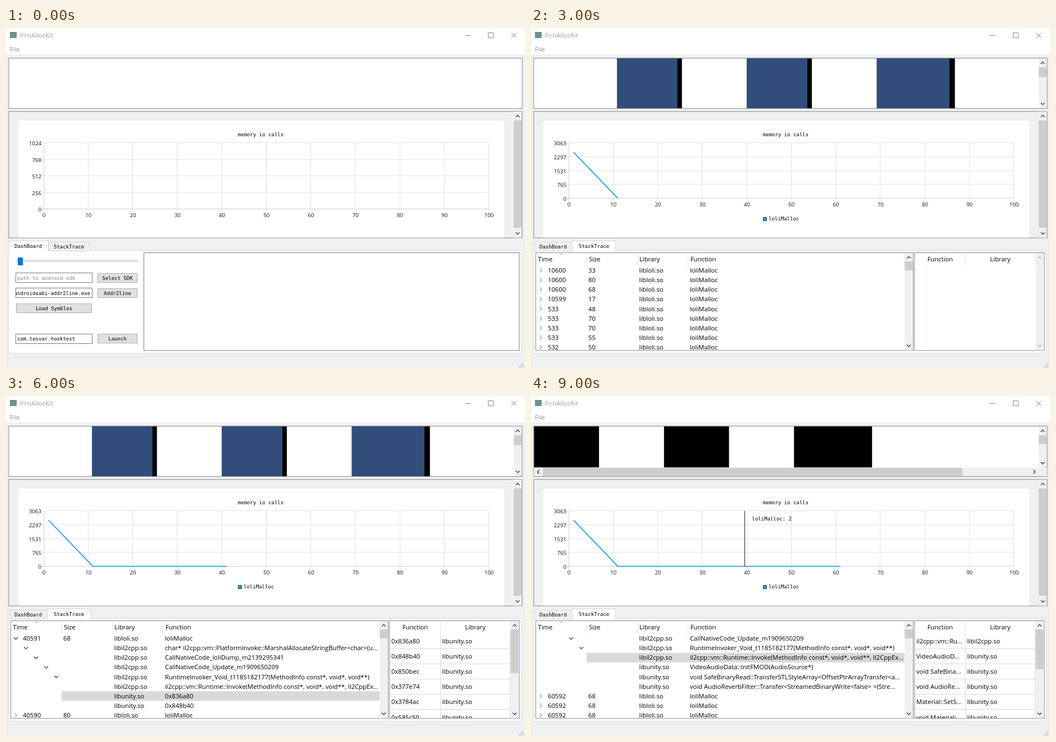
These frames come from a looping animation (924x606 px, 10 s). An HTML page:

```html
<!DOCTYPE html>
<html lang="en">
<head>
<meta charset="utf-8">
<title>Memory profiler session</title>
<style>
  html, body { margin: 0; width: 100%; height: 100%; overflow: hidden; background: #f0f0f0; }
  svg { display: block; }
  text { font: 11.23px "Open Sans", "Noto Sans CJK SC", "Noto Sans CJK", sans-serif; white-space: pre; }
  .mono { font: 9.02px "DejaVu Sans Mono", monospace; }
  .axis { font-size: 9.7px; }
  .dialog { filter: drop-shadow(0 1px 4px #0007); }
</style>
</head>
<body>
<svg id="stage" width="924" height="606" viewBox="0 0 924 606"></svg>
<script>
const BORDER = '#828790', GRID = '#e2e2e2', SELECTED = '#d9d9d9', BLUE = '#209fdf';

// ---- drawing helpers, each returns SVG markup
const escapeText = s => String(s).replace(/&/g, '&amp;').replace(/</g, '&lt;');
const text = (x, y, s, fill = '#000', anchor = 'start', cls = '') =>
  `<text x="${x}" y="${y}" fill="${fill}" text-anchor="${anchor}" class="${cls}">${escapeText(s)}</text>`;
const mono = (x, y, s, fill, anchor) => text(x, y, s, fill, anchor, 'mono');
const fill = (x, y, w, h, color, extra = '') =>
  `<rect x="${x}" y="${y}" width="${w}" height="${h}" fill="${color}" ${extra}/>`;
// outlined box with its border just inside x..x2, y..y2
const box = (x, y, x2, y2, color, stroke) =>
  fill(x + .5, y + .5, x2 - x - 1, y2 - y - 1, color, `stroke="${stroke}"`);
const path = (d, stroke, width = 1, extra = '') =>
  `<path d="${d}" fill="none" stroke="${stroke}" stroke-width="${width}" ${extra}/>`;
const clip = (x, y, w, h, content) =>
  `<svg x="${x}" y="${y}" width="${w}" height="${h}" viewBox="${x} ${y} ${w} ${h}">${content}</svg>`;
const turns = { down: 0, up: 180, right: -90, left: 90 };
const chevron = (x, y, dir, color = '#505050', width = 1.5, size = 3.4) =>
  path(`M${-size} ${-size / 2}L0 ${size / 2} ${size} ${-size / 2}`, color, width,
    `transform="translate(${x} ${y}) rotate(${turns[dir]})"`);
const triangle = (x, y, color, size = 3.5) =>
  `<path d="M${x - size} ${y - size / 2}h${size * 2}l${-size} ${size * 1.1}z" fill="${color}"/>`;
const map = (list, f) => list.map(f).join('');

function scrollbar(x, y, y2, thumb) {
  const color = thumb ? '#505050' : '#bdbdbd', cx = x + 7;
  return fill(x, y, 14, y2 - y, '#f0f0f0') + (thumb ? fill(x, thumb[0], 14, thumb[1] - thumb[0], '#cdcdcd') : '') +
    chevron(cx, y + 8, 'up', color) + chevron(cx, y2 - 8, 'down', color);
}

// ---- main window
function windowFrame() {
  return fill(0, 0, 924, 606, '#f0f0f0') + fill(0, 0, 924, 47, '#fff') +
    fill(7, 7, 12, 11, '#6f9290') + text(25, 17, 'FirnAllocKit', '#999') + text(7, 42, 'File', '#8a8a8a') +
    path('M817 13.5h10M858.5 8.5h9v9h-9zM899.5 8.5l9 9m0-9l-9 9', '#888') +
    map([[919, 598], [916, 601], [919, 601], [913, 604], [916, 604], [919, 604]], ([x, y]) => fill(x, y - 1, 2, 2, '#bfbfbf'));
}

function screenshots({ shots = [], black, wide }) {
  const bottom = wide ? 127.5 : 143;
  let out = box(4.4, 53.2, 919.4, 143.9, '#fff', BORDER);
  shots.forEach((x, i) => {
    const last = i == shots.length - 1, w = last ? 139 : 115.7, edge = last ? 9.7 : 8;
    out += fill(x, 54.2, w, bottom - 54.2, '#000') + (black ? '' : fill(x, 54.2, w - edge, bottom - 54.2, '#314e7b'));
  });
  if (shots.length) out += scrollbar(904, 54.2, bottom, [70, wide ? 86 : 87.5]);
  if (wide) out += fill(5.4, 127.5, 913, 15.4, '#f0f0f0') + fill(21, 128, 747, 14.5, '#cdcdcd') +
    chevron(13, 135.3, 'left') + chevron(896, 135.3, 'right');
  return out;
}

function chart({ end, marker }) {
  const bottom = end ? 304 : 323, px = v => 67.5 + v * 7.925;
  const labels = end ? [3063, 2297, 1531, 765, 0] : [1024, 768, 512, 256, 0];
  let out = box(4.4, 148.3, 919.4, 374.6, '#f0f0f0', BORDER) +
    '<path d="M22 373.500V169q0-4 4-4H883q4 0 4 4V373.500z" fill="#fff"/>' +
    mono(453.5, 193, 'memory io calls', '#000', 'middle');
  labels.forEach((label, i) => {
    const y = Math.round(205 + (bottom - 205) * i / 4) - .5;
    out += path(`M63 ${y}H860`, i == 4 ? '#cfcfcf' : GRID) + text(63, y + 4, label, '#111', 'end', 'axis');
  });
  for (let v = 0; v <= 100; v += 10) {
    const x = Math.round(px(v)) - .5;
    out += path(`M${x} 205V${bottom + 4}`, v ? GRID : '#cfcfcf') +
      text(px(v), bottom + 13.5, v, '#111', 'middle', 'axis');
  }
  if (end) {
    out += path(`M${px(1)} 221L${px(11)} 303.700${end > 11 ? 'H' + px(end) : ''}`, BLUE, 1.8) +
      fill(413.5, 337.5, 6, 6, BLUE, 'stroke="#24465a"') + mono(423, 343, 'loliMalloc');
  }
  if (marker) out += path('M380.500 205V304', '#555', 1.5) + mono(393.5, 222, 'loliMalloc: 2');
  return out + scrollbar(904, 149, 374, [165, 356]);
}

function tabs(stackActive) {
  const tab = (x, x2, label, tx, active) =>
    box(x, active ? 379 : 381, x2, 398, active ? '#fff' : '#f0f0f0', '#d9d9d9') +
    (active ? fill(x + 1, 396, x2 - x - 2, 2, '#fff') : '') + mono(tx, active ? 391.5 : 392.5, label);
  const first = () => tab(stackActive ? 6 : 5, stackActive ? 74 : 76, 'DashBoard', 15, !stackActive);
  const second = () => tab(stackActive ? 73 : 76, stackActive ? 151 : 150, 'StackTrace', 85, stackActive);
  return box(4, 396, 918, 580, '#fff', '#dcdcdc') + (stackActive ? first() + second() : second() + first());
}

function dashboard({ launched }) {
  const button = (x, y, w, label, off) => box(x, y, x + w, y + 17, off ? '#ccc' : '#e1e1e1', off ? '#bfbfbf' : '#adadad') +
    mono(x + w / 2, y + 12, label, off ? '#838383' : '#000', 'middle');
  const input = (y, content) => box(17, y, 154, y + 18, '#fff', '#7a7a7a') + clip(18, y, 134, 18, content);
  return fill(18.5, 413.5, 216, 3, '#e7eaea', 'stroke="#d6d6d6"') + fill(21, 409, 9, 14, '#0078d7') +
    input(436, mono(20, 448.5, 'path to android sdk', '#808080')) + button(163, 437, 71, 'Select SDK') +
    input(463, mono(150, 475.5, 'arm-linux-androideabi-addr2line.exe', '#000', 'end')) + button(163, 464, 71, 'Addr2line') +
    button(18, 491, 135, 'Load Symblos') +
    input(545, mono(20, 557, 'com.tesvar.hooktest')) + button(163, 545, 71, 'Launch', launched) +
    box(245, 400, 914.4, 575.3, '#fff', '#7a7a7a') + (launched ? mono(250, 413, 'Application Started ...') : '');
}

// ---- stack trace tab; a row is [depth, open, time, size, library, function]
const leaf = (lib, fn) => [0, null, '', '', lib, fn];
const node = (depth, fn) => [depth, true, '', '', 'libil2cpp.so', fn];
const call = (time, size, open = false) => [0, open, time, size, 'libloli.so', 'loliMalloc'];
const update = 'CallNativeCode_Update_m1909650209';
const invoker = 'RuntimeInvoker_Void_t1185182177(MethodInfo const*, void*, void**)';
const invoke = 'il2cpp::vm::Runtime::Invoke(MethodInfo const*, void*, void**, Il2CppEx...';

const firstCalls = [[10600, 33], [10600, 80], [10600, 68], [10599, 17], [533, 48], [533, 70], [533, 70], [533, 55], [532, 50]]
  .map(([time, size]) => call(time, size));
const expandedCall = [
  call(40591, 68, true),
  node(1, 'char* il2cpp::vm::PlatformInvoke::MarshalAllocateStringBuffer<char>(u...'),
  node(2, 'CallNativeCode_loliDump_m2139295341'), node(3, update), node(4, invoker),
  leaf('libil2cpp.so', invoke), leaf('libunity.so', '0x836a80'), leaf('libunity.so', '0x848b40'),
  call(40590, 80)
];
const resolvedCall = [
  node(3, update), node(4, invoker), leaf('libil2cpp.so', invoke),
  leaf('libunity.so', 'VideoAudioData::InitFMOD(AudioSource*)'),
  leaf('libunity.so', 'void SafeBinaryRead::TransferSTLStyleArray<OffsetPtrArrayTransfer<a...'),
  leaf('libunity.so', 'void AudioReverbFilter::Transfer<StreamedBinaryWrite<false> >(Stre...'),
  call(60592, 68), call(60592, 68), call(60592, 68)
];
const withLib = (lib, names) => names.map(name => [name, lib]);
const firstFrames = [['loliMalloc', 'libloli.so'],
  ...withLib('libil2cpp.so', ['operator new...', '0x62903c', '0x6297cc', '0x629878', '0x629ae4'])];
const rawFrames = withLib('libunity.so', ['0x836a80', '0x848b40', '0x850bec', '0x377e74', '0x3784ac', '0x585c50']);
const resolvedFrames = [['il2cpp::vm::Ru...', 'libil2cpp.so'],
  ...withLib('libunity.so', ['VideoAudioD...', 'void SafeBina...', 'void AudioRe...', 'Material::SetS...', 'void Material:...'])];

function stackTrace({ rows = [], selected, frames = [], thumb }) {
  const tree = map(rows, ([depth, open, time, size, lib, fn], i) => {
    const y = 432 + i * 17.13, base = y + 4, isCall = time !== '';
    const left = isCall ? 27 : 99;
    return (i === selected ? fill(left, y - 8.5, 665 - left, 17, SELECTED) : '') +
      (open === null ? '' : chevron(17.5 + depth * 18, y, open ? 'down' : 'right', open ? '#404040' : '#a0a0a0', 1.3, 3.6)) +
      text(30, base, time) + text(102, base, size) + text(192.6, base, lib) + text(283, base, fn);
  });
  const table = map(frames, ([fn, lib], i) => {
    const y = 436.5 + i * 27.2;
    return text(686, y + 4, fn) + text(776.5, y + 4, lib) +
      path(`M684 ${Math.round(y + 13)}.5H897M773.500 ${y - 13}v27M897.500 ${y - 13}v27`, '#d8d8d8');
  });
  return box(8, 400, 681, 575.3, '#fff', BORDER) + box(682.4, 400, 914.4, 575.3, '#fff', BORDER) +
    path('M98.500 402v22M189.500 402v22M279.500 402v22M664.500 402v22M773.500 402v22M897.500 402v22', '#e5e5e5') +
    chevron(54, 403, 'down', '#a0a0a0', 1, 3) +
    map([['Time', 12.5], ['Size', 103], ['Library', 193], ['Function', 284]], ([s, x]) => text(x, 416, s)) +
    text(728.5, 416, 'Function', '#000', 'middle') + text(835.5, 416, 'Library', '#000', 'middle') +
    clip(9, 401, 671, 173.3, tree) + clip(683.4, 401, 230, 173.3, table) +
    scrollbar(665.5, 401, 574.3, rows.length && [416, 432]) + scrollbar(898.5, 401, 574.3, thumb && [416, thumb]);
}

// ---- file dialog
const stamp = '2019/5/24 14:56';
const buildFolder = {
  crumbs: [['Unity', 140], ['NativePluginTest', 189], ['Temp', 298], ['StagingArea', 351], ['libs', 437], ['armeabi-v7a', 478]],
  files: [['Data', stamp, '文件夹', ''], ['libil2cpp.so', stamp, 'SO 文件', '7,872 KB'],
    ['libil2cpp.sym', stamp, 'SYM 文件', '58,477 KB'], ['libloli.so', '2019/5/24 14:23', 'SO 文件', '366 KB'],
    ['libmain.so', '2018/4/26 18:30', 'SO 文件', '25 KB'], ['libunity.so', '2018/4/26 18:31', 'SO 文件', '33,628 KB'],
    ['libxhook.so', '2019/5/24 14:23', 'SO 文件', '22 KB']],
  chosen: 2
};
const symbolFolder = {
  crumbs: [['AndroidPlayer', 140], ['Variations', 237], ['il2cpp', 312], ['Release', 366], ['Symbols', 429], ['armeabi-v7a', 496]],
  files: [['libmain.sym.so', '2018/4/26 18:34', 'SO 文件', '8 KB'], ['libunity.sym.so', '2018/4/26 18:38', 'SO 文件', '6,181 KB']],
  chosen: 1
};

const folderIcon = (x, y) => fill(x, y, 11, 13, '#ffd977') + fill(x, y, 2, 13, '#efbd4a');
const pageIcon = (x, y) => `<path d="M${x + .5} ${y + .5}h7l3 3v9h-10z" fill="#fff" stroke="#8c8c8c"/>`;
const screenIcon = (x, y) => fill(x, y - 5, 14, 9, '#2b95dd') + fill(x + 4, y + 5, 6, 1.5, '#4a7895');
const placeIcons = {
  cube: (x, y) => `<path d="M${x} ${y - 4}l7-2 6 2v8l-6 3-7-3z" fill="#29a3d8"/><path d="M${x + 7} ${y - 1}l6-3v8l-6 3z" fill="#1479b0"/>`,
  cloud: (x, y) => path(`M${x + 3} ${y + 4}a3 3 0 0 1 0-5a4 4 0 0 1 7-1a3 3 0 0 1 0 6z`, '#3a9be0', 1.3),
  film: (x, y) => fill(x + 1, y - 6, 12, 12, '#444') + fill(x + 4, y - 5, 6, 4.5, '#8fb4d8') + fill(x + 4, y + .5, 6, 4.5, '#c58b58'),
  picture: (x, y) => box(x, y - 5, x + 14, y + 5, '#d9effa', '#8c8c8c') + fill(x + 2, y, 10, 3, '#3c8cb5'),
  page: (x, y) => pageIcon(x + 1, y - 6) + path(`M${x + 4} ${y - 2}h5m-5 2.500h5m-5 2.500h5`, '#4d94c9'),
  arrow: (x, y) => `<path d="M${x + 5} ${y - 6}h4v5h4l-6 7-6-7h4z" fill="#2b8fdd"/>`,
  note: (x, y) => `<circle cx="${x + 5}" cy="${y + 4}" r="2.6" fill="#1d86d8"/>` + path(`M${x + 7} ${y + 4}v-10q1 4 4 5v3`, '#1d86d8', 1.6),
  desktop: (x, y) => fill(x, y - 5, 14, 11, '#1d8fe1') + fill(x, y + 4, 14, 2, '#1468a8'),
  disk: (x, y) => `<path d="M${x + 2} ${y}h9l2 3h-13z" fill="#c4c4c4"/>` + fill(x, y + 2.5, 13, 3.5, '#4d4d4d'),
  network: (x, y) => fill(x + 4, y - 6, 9, 7, '#5db5e8') + fill(x, y - 2, 9, 7, '#3385c6')
};
const places = [['3D 对象', 'cube'], ['企业云盘同步盘', 'cloud'], ['视频', 'film'], ['图片', 'picture'], ['文档', 'page'],
  ['下载', 'arrow'], ['音乐', 'note'], ['桌面', 'desktop'], ['System (C:)', 'disk'], ['本地磁盘 (D:)', 'disk'], ['本地磁盘 (E:)', 'disk']];

function sidebar() {
  const items = map(places, ([label, icon], i) => {
    const y = 155 + i * 21.73;
    return placeIcons[icon](35.5, y) + text(54, y + 4, label);
  });
  return fill(7, 362, 120, 21, SELECTED) + clip(7, 116, 120, 320,
    screenIcon(28, 133) + text(46.5, 137, '此电脑') + items + placeIcons.network(28, 401) + text(46.5, 405, '网络')) +
    scrollbar(127, 116, 436, [203, 420]);
}

function fileList({ files, chosen }) {
  const gray = '#6d6d6d', head = '#4c607a';
  return path('M391.500 116v24M499.500 116v24M608.500 116v24M680.500 116v24', '#e5e5e5') + chevron(273, 118, 'up', '#777', 1, 3.4) +
    map([['名称', 161], ['修改日期', 397], ['类型', 505], ['大小', 614]], ([s, x]) => text(x, 132, s, head)) +
    map(files, ([name, date, type, size], i) => {
      const y = 155 + i * 19;
      return (i == chosen ? fill(158, y - 9.5, 519, 19, SELECTED) : '') +
        (size ? pageIcon : folderIcon)(163, y - 7) + text(180, y + 4, name) +
        text(397, y + 4, date, gray) + text(505, y + 4, type, gray) + text(673.5, y + 4, size, gray, 'end');
    });
}

function fileDialog(folder) {
  const button = (x, x2, label, cx) => box(x, 475, x2, 497, '#e1e1e1', '#adadad') + text(cx, 489.5, label, '#000', 'middle');
  const navy = '#1e395b';
  return `<g class="dialog">${box(6, 27, 860.5, 508.8, '#f0f0f0', '#9c9c9c')}</g>` +
    fill(7, 28, 852.5, 408, '#fff') + fill(7, 87, 852.5, 28, '#f5f6f7') +
    fill(14, 36, 12, 10, '#6f9290') + text(32, 45, 'Select Symblo File', '#8d8d8d') + path('M842 37l8 8m0-8l-8 8', '#888') +
    path('M29 70.500H19m4-4l-4 4 4 4M90.500 75V66m-4 4l4-4 4 4', '#444', 1.5) +
    path('M45 70.500h10m-4-4l4 4-4 4', '#d0d0d0', 1.3) + chevron(72, 70, 'down', '#777', 1.2, 2.6) +
    box(102, 60, 659, 81, '#fff', '#d9d9d9') + path('M637.500 61v19', '#d9d9d9') + folderIcon(107, 63.5) +
    text(124, 73, '«') + map(folder.crumbs, ([name, x], i) => text(x, 73.5, name) +
      (i ? chevron(x - 11.5, 70, 'right', '#444', 1.1, 2.6) : '')) +
    chevron(628, 70.5, 'down', '#444', 1.4) + path('M649.500 68a4 4 0 1 1-3-2m0-2v4h3', '#555', 1.3) +
    box(666, 60, 849, 81, '#fff', '#d9d9d9') + text(674.5, 74, '搜索"armeabi-v7a"', '#6d6d6d') +
    path('M835 71l-4 4M834.500 69a3 3 0 1 0 6 0a3 3 0 1 0-6 0', '#444', 1.4) +
    text(23, 104.5, '组织', navy) + triangle(53, 100, navy) + text(83.5, 104.5, '新建文件夹', navy) +
    map([96, 100, 104], y => path(`M750 ${y}h4m2 0h3m2 0h3`, '#8a8a8a', 1.6)) + triangle(776, 100, navy) +
    box(799, 95, 814, 106, '#fff', '#5a7fa8') + fill(807, 96, 6, 9, '#3a9be0') +
    '<circle cx="839" cy="100.500" r="7.300" fill="#0f5fae"/>' + text(839, 104.5, '?', '#fff', 'middle') +
    sidebar() + path('M142.500 116V436', '#f0f0f0') + fileList(folder) +
    text(175.5, 461.5, '文件名(N):', '#000', 'end') + box(180, 446, 664, 469, '#fff', '#7a7a7a') +
    text(183.5, 462, folder.files[folder.chosen][0]) + chevron(655, 458, 'down', '#555', 1.2) +
    box(674, 446, 845, 469, '#e1e1e1', '#adadad') + text(678, 461.5, 'Library Files (*.sym *.sym.so') + chevron(836, 458, 'down', '#555', 1.2) +
    button(675, 754, '打开(O)', 706) + path('M738.500 478v16', '#555') + triangle(745.5, 485.5, '#000', 5) +
    button(766, 844, '取消', 805) +
    map([[856, 501], [853, 504], [856, 504]], ([x, y]) => fill(x, y, 2, 2, '#bfbfbf'));
}

// ---- one scene per second
const three = [153, 384.3, 615.7], shifted = [38, 269.3, 500.7];
const captured = { stack: true, shots: three, end: 11, rows: firstCalls };
const scenes = [
  {},
  { launched: true },
  { stack: true, shots: [385] },
  captured,
  { ...captured, selected: 0, frames: firstFrames, thumb: 449 },
  { launched: true, shots: three, end: 31, dialog: buildFolder },
  { stack: true, shots: three, end: 41, rows: expandedCall, selected: 6, frames: rawFrames, thumb: 494 },
  { launched: true, shots: shifted, end: 51 },
  { launched: true, shots: shifted, end: 51, dialog: symbolFolder },
  { stack: true, shots: [5.4, 236.8, 468.2], black: true, wide: true, end: 61, marker: true,
    rows: resolvedCall, selected: 2, frames: resolvedFrames, thumb: 487 }
];

const render = scene => windowFrame() + screenshots(scene) + chart(scene) + tabs(!!scene.stack) +
  (scene.stack ? stackTrace(scene) : dashboard(scene)) + (scene.dialog ? fileDialog(scene.dialog) : '');

const stage = document.getElementById('stage');
let shown = -1;
function tick() {
  const index = Math.floor(performance.now() % 10000 / 1000);
  if (index !== shown) stage.innerHTML = render(scenes[shown = index]);
  requestAnimationFrame(tick);
}
tick();
</script>
</body>
</html>
```
